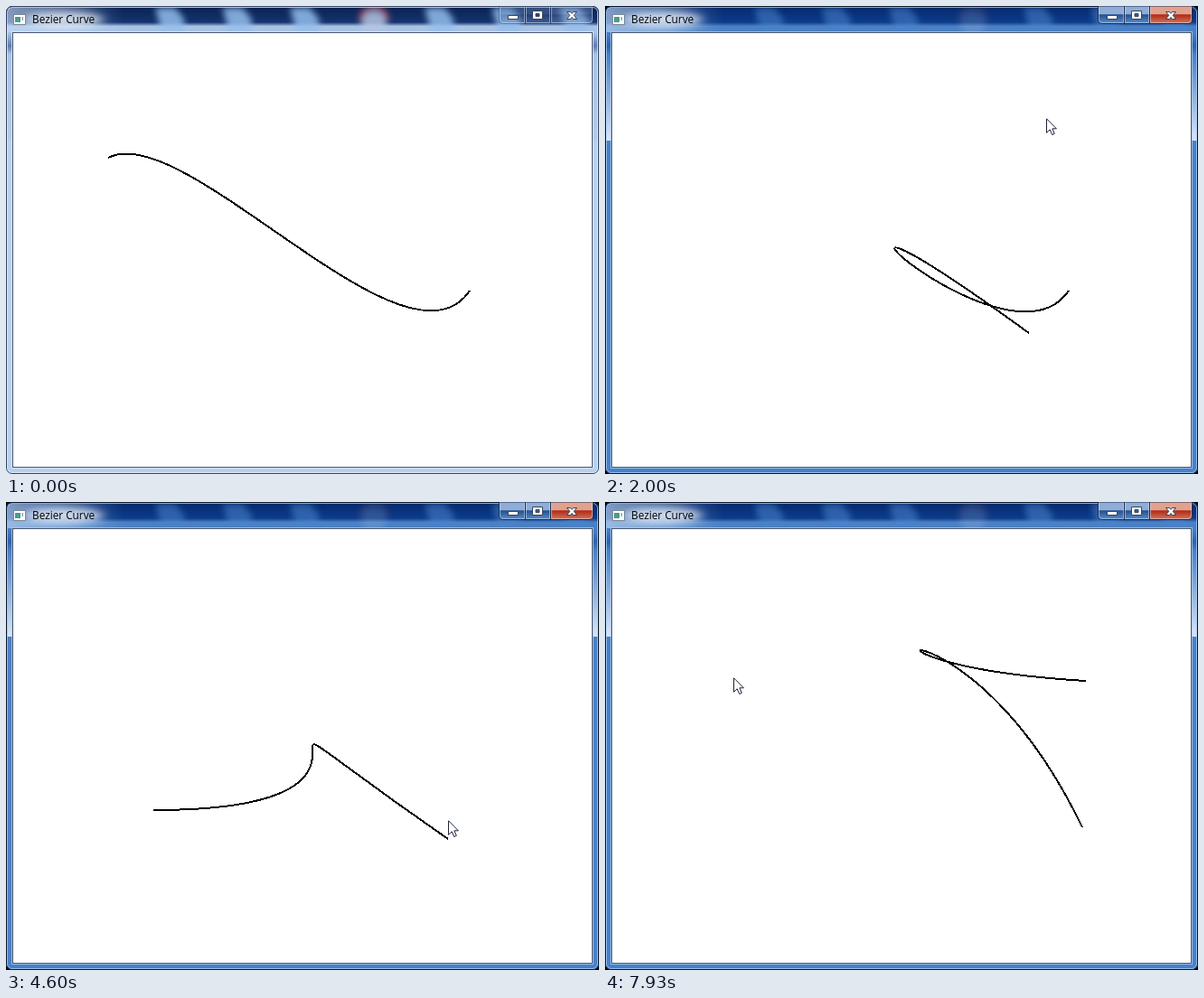
These frames come from a looping animation (656 px wide and 518 px high, 8 s). An HTML page:

```html
<!DOCTYPE html>
<html lang="en">
<head>
<meta charset="utf-8">
<title>Bezier Curve</title>
<style>
  html, body { margin: 0; width: 100%; height: 100%; overflow: hidden; background: #000; }
  svg {
    display: block; width: 656px; height: 518px;
    --out: #dfe7f2; --edge: #34435c; --rim: #dfeaf8; --frame: #b9d1ee;
    --top: #0a2153; --mid: #14346f; --low: #a9c3e5;
    --side1: #a9c3e5; --side2: #5c7cb0; --side3: #b4cbe8;
    --blob: #93bdec; --blobs: .85; --ring: .85; --glass: .4;
    --btn1: #6f8cbb; --btn2: #3f5f97; --btn3: #7f9dca;
    --close1: #7f9ac6; --close2: #5674a8; --close3: #8dabd6;
  }
  svg.active {
    --out: #000; --edge: #0a1526; --rim: #a9cbf2; --frame: #4a80c8;
    --top: #05296b; --mid: #0c3c8b; --low: #4a80c4;
    --side1: #4a80c4; --side2: #2c62ad; --side3: #dbe6f5;
    --blob: #4b84cd; --blobs: .55; --ring: .2; --glass: 1;
    --btn1: #8fadd6; --btn2: #24508f; --btn3: #5d8fcb;
    --close1: #e2a18f; --close2: #b02a17; --close3: #d8775a;
  }
  stop { stop-color: var(--c); }
  .title { font: 11.8px "Open Sans", "Noto Sans", sans-serif; fill: #000; }
  .crisp { shape-rendering: crispEdges; }
</style>
</head>
<body>
<svg id="win" viewBox="0 0 656 518">
  <defs>
    <linearGradient id="bar" x2="0" y2="1">
      <stop offset="0" style="--c:var(--top)"/>
      <stop offset=".6" style="--c:var(--mid)"/>
      <stop offset=".75" style="--c:var(--low)"/>
    </linearGradient>
    <linearGradient id="side" x2="0" y2="1">
      <stop offset="0" style="--c:var(--side1)"/>
      <stop offset=".12" style="--c:var(--side2)"/>
      <stop offset=".2" style="--c:var(--low)"/>
      <stop offset="1" style="--c:var(--side3)"/>
    </linearGradient>
    <linearGradient id="btn" x2="0" y2="1">
      <stop offset=".45" style="--c:var(--btn1)"/>
      <stop offset=".5" style="--c:var(--btn2)"/>
      <stop offset="1" style="--c:var(--btn3)"/>
    </linearGradient>
    <linearGradient id="close" x2="0" y2="1">
      <stop offset=".45" style="--c:var(--close1)"/>
      <stop offset=".5" style="--c:var(--close2)"/>
      <stop offset="1" style="--c:var(--close3)"/>
    </linearGradient>
    <linearGradient id="sheen">
      <stop offset="0" style="--c:#c4daf5"/>
      <stop offset="1" stop-opacity="0" style="--c:#c4daf5"/>
    </linearGradient>
    <filter id="soft" x="-50%" y="-80%" width="200%" height="260%"><feGaussianBlur stdDeviation="3.5"/></filter>
    <filter id="glow" x="-30%" y="-80%" width="160%" height="260%"><feGaussianBlur stdDeviation="6 4"/></filter>
    <clipPath id="shape"><rect width="656" height="518" rx="7"/></clipPath>
    <clipPath id="strip"><rect x="2" y="2" width="652" height="27"/></clipPath>
  </defs>

  <rect width="656" height="518" fill="var(--out)"/>
  <g clip-path="url(#shape)">
    <rect width="656" height="518" fill="var(--frame)"/>
    <rect width="656" height="30" fill="url(#bar)"/>
    <rect y="30" width="8" height="119" fill="url(#side)"/>
    <rect x="648" y="30" width="8" height="119" fill="url(#side)"/>
    <g clip-path="url(#strip)">
      <g id="blobs" fill="var(--blob)" opacity="var(--blobs)" filter="url(#soft)"></g>
      <g opacity="var(--ring)" filter="url(#soft)">
        <circle cx="407" cy="19" r="14" fill="#b3c5e2"/>
        <path d="M392 16A15 15 0 0 1 422 16" fill="none" stroke="#b03a48" stroke-width="5"/>
      </g>
      <rect width="130" height="30" fill="url(#sheen)" opacity=".65"/>
      <ellipse cx="64" cy="15" rx="44" ry="9" fill="#eef4fc" opacity=".8" filter="url(#glow)"/>
    </g>
  </g>
  <rect x=".5" y=".5" width="655" height="517" rx="6.5" fill="none" stroke="var(--edge)"/>
  <rect x="1.5" y="1.5" width="653" height="515" rx="5.5" fill="none" stroke="var(--rim)" opacity=".8"/>
  <rect x="6.5" y="28.5" width="643" height="483" fill="none" stroke="var(--rim)" opacity=".75"/>
  <rect x="7.5" y="29.5" width="641" height="481" fill="#fff" stroke="#46566f"/>

  <g class="crisp">
    <rect x="8" y="9" width="14" height="12" fill="#7d8a98"/>
    <rect x="9" y="10" width="12" height="10" fill="#fff"/>
    <rect x="10" y="12" width="6" height="6" fill="#4d9a86"/>
    <rect x="18" y="12" width="1" height="4" fill="#7f8fa4"/>
  </g>
  <text class="title" x="29" y="18.5">Bezier Curve</text>

  <g stroke="#1b2c4d" opacity="var(--glass)">
    <path d="M545.5 0V15.5Q545.5 19.5 549.5 19.5H602.5V0Z" fill="url(#btn)"/>
    <path d="M602.5 0V19.5H645Q649.5 19.5 649.5 15.5V0Z" fill="url(#close)"/>
    <path d="M574.5 0V19"/>
  </g>
  <path d="M546.5 1V15Q546.5 18.5 550 18.5H573.5V1M575.5 1V18.5H601.5V1M603.5 1V18.5H645Q648.5 18.5 648.5 15V1" fill="none" stroke="#dce9fa" opacity=".5"/>
  <g stroke="#3a465c" fill="#fff">
    <rect x="555.5" y="10.5" width="11" height="4"/>
    <path fill-rule="evenodd" d="M582.5 5.5H593.5V14.5H582.5ZM586 8.5V11.5H590V8.5Z"/>
    <path d="M620.5 6.5H624.5L626 8.3L627.5 6.5H631.5L628.2 10.3L631.5 14.5H627.5L626 12.4L624.5 14.5H620.5L623.8 10.3Z"/>
  </g>

  <path id="curve" class="crisp" fill="none" stroke="#000" stroke-width="2"/>
  <path id="cursor" d="M.5 .8V16.3L4.2 12.8L6.7 18.5L9.3 17.4L6.9 11.8H11.4Z" fill="#fff" stroke="#1d2238"/>
</svg>
<script>
  const LOOP = 8000, STEP = 1000 / 15;
  const el = id => document.getElementById(id);
  const win = el("win"), curve = el("curve"), cursor = el("cursor");

  // Blurred desktop icons, about one every 75 px
  for (let x = 180; x < 656; x += 74.5) {
    if (Math.abs(x - 407) < 20) continue;
    el("blobs").innerHTML += `<path d="M${x - 15} 2H${x + 7}L${x + 17} 14V28H${x - 8}Z"/>`;
  }

  const start = [[113, 168], [198, 124], [443, 419], [513, 315]];

  // Clicks place the control points in turn: 1, 0, 3, 2, 1, ...
  const click = (at, x, y) => ({ at, x, y, click: true });
  const pass = (at, x, y) => ({ at, x, y });
  const path = [
    pass(330, 610, 168), pass(400, 439, 172), pass(600, 439, 172), pass(930, 148, 128),
    click(1000, 144, 126), click(1400, 469, 362),
    pass(1730, 446, 151), pass(2000, 488, 124), pass(2400, 112, 330),
    click(2600, 163, 341), click(3070, 508, 341),
    pass(3400, 375, 184), pass(3730, 172, 161),
    click(3870, 179, 158), pass(4200, 563, 387), click(4400, 489, 373),
    pass(4600, 489, 353), pass(4730, 489, 128), pass(4870, 489, 128),
    click(5200, 262, 339), click(5530, 462, 346), pass(5800, 457, 323),
    click(6130, 202, 178), click(6730, 532, 198),
    click(7130, 528, 360), click(7530, 392, 77), pass(7930, 142, 194)
  ];
  const clicks = path.filter(p => p.click);
  const ease = f => f * f * (3 - 2 * f);

  function pointerAt(t) {
    const i = path.findIndex(p => p.at > t);
    const b = path[i < 0 ? path.length - 1 : i], a = i < 0 ? b : path[i - 1];
    const f = a === b ? 0 : ease((t - a.at) / (b.at - a.at));
    return [a.x + (b.x - a.x) * f, a.y + (b.y - a.y) * f].map(Math.round);
  }

  function draw(now) {
    // The picture advances 15 times per second
    const t = Math.floor((now % LOOP + 3.5) / STEP) * STEP + 4;
    const p = start.slice();
    const done = clicks.filter(c => c.at <= t);
    done.forEach((c, n) => { p[n % 4 ^ 1] = [c.x, c.y]; });
    curve.setAttribute("d", `M${p[0]}C${p[1]} ${p[2]} ${p[3]}`);
    win.classList.toggle("active", done.length > 0);
    const shown = t >= path[0].at;
    cursor.style.display = shown ? "" : "none";
    if (shown) cursor.setAttribute("transform", `translate(${pointerAt(t)})`);
  }

  const begin = performance.now();
  function tick() {
    draw(performance.now() - begin);
    requestAnimationFrame(tick);
  }
  tick();
</script>
</body>
</html>
```
